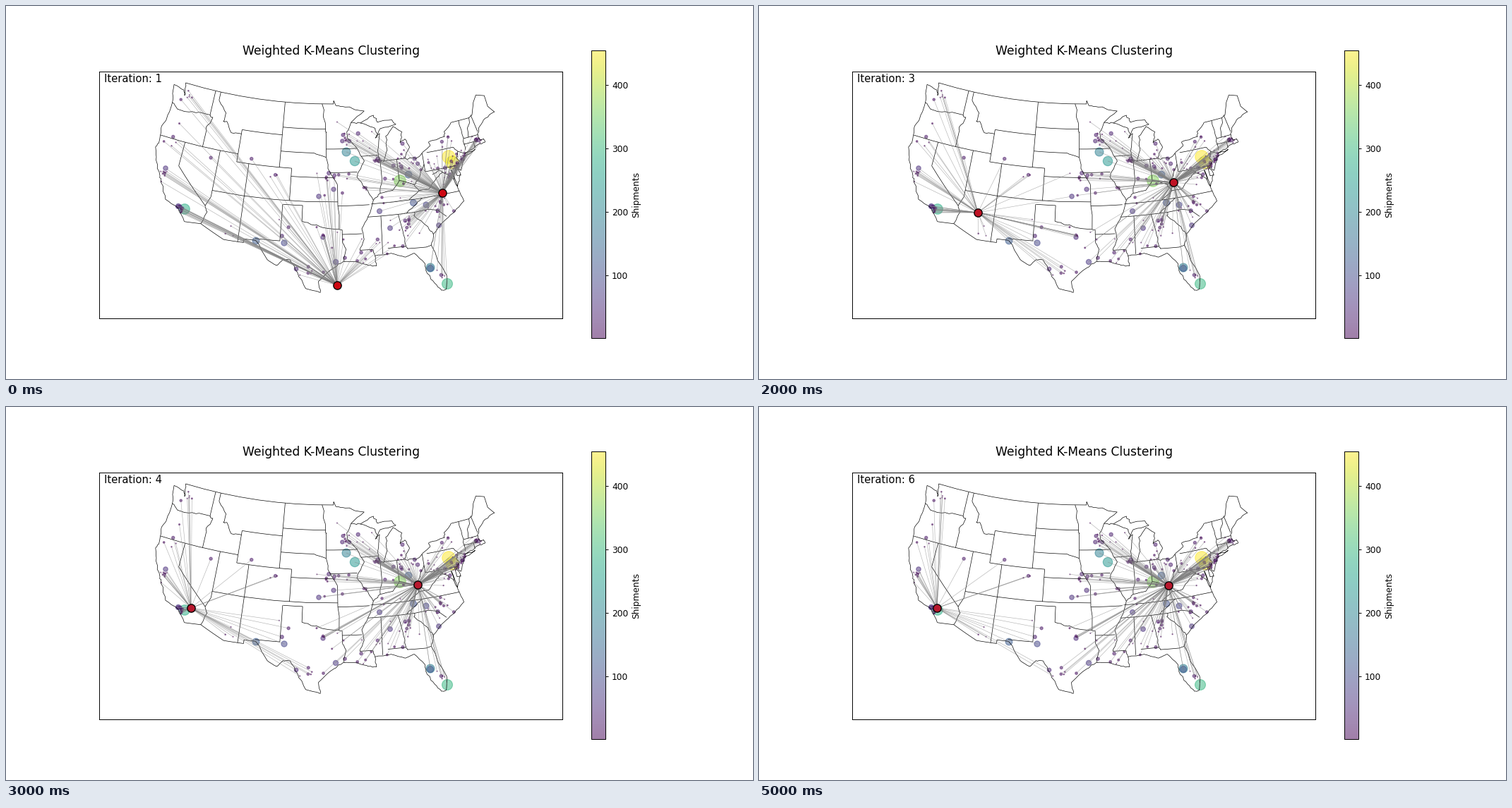
Write a matplotlib script that moves like this. It is 1058x529 px and loops after 6 s.

```python
import numpy as np
import matplotlib.pyplot as plt
from matplotlib.animation import FuncAnimation
from matplotlib.collections import LineCollection
from matplotlib.path import Path

W, H = 1058, 529
LEFT, RIGHT, TOP, BOTTOM = 132.25, 788.4, 93.0, 442.6
MAX_LOAD = 454

plt.rcParams["font.family"] = "DejaVu Sans"
rng = np.random.default_rng(11)

# Lambert conformal conic, parallels 33 and 45, meridian 96 W
CONE = 0.63051
RADIUS = 1.95495


def project(west, lat):
    """Degrees west and north to stage pixels."""
    rho = RADIUS / np.tan(np.pi / 4 + np.radians(lat) / 2) ** CONE
    theta = np.radians(96 - west) * CONE
    return 457.2 + 664.2 * rho * np.sin(theta), 664.2 * rho * np.cos(theta) - 559.3


def trace(*coords, rough=0.0):
    """Join west, lat pairs; rough lines wander a little between them."""
    west, lat = np.reshape(coords, (-1, 2)).T
    key = np.arange(len(west))
    t = np.linspace(0, len(west) - 1, (len(west) - 1) * 4 + 1)
    line = np.column_stack(project(np.interp(t, key, west), np.interp(t, key, lat)))
    wander = rng.normal(0, 1, line.shape) * rough
    wander[::4] = 0
    return line + wander


def river(*coords):
    return trace(*coords, rough=0.6)


coast = [
    # Pacific
    river(122.76, 49, 122.3, 47.5, 122.7, 48.1, 124.7, 48.38, 124, 46.25, 124.1, 44,
          124.5, 42.85, 124.1, 41, 124.4, 40.4, 123.7, 38.9, 122.4, 37.2, 121.9, 36.4,
          120.6, 34.6, 118.5, 34, 117.12, 32.53),
    # Southern border
    trace(117.12, 32.53, 114.72, 32.72, 111.07, 31.33, 108.2, 31.33, 108.2, 31.78,
          106.53, 31.78),
    river(106.53, 31.78, 104.6, 29.6, 103.2, 28.98, 102.4, 29.75, 101.4, 29.77,
          100.3, 28.3, 99.1, 26.4, 97.14, 25.96),
    # Gulf and Florida
    river(97.14, 25.96, 97.4, 27.3, 95.3, 28.95, 94, 29.68, 92, 29.6, 90.5, 29.1,
          89.4, 28.98, 89.5, 30.2, 87.2, 30.35, 85.3, 29.7, 84, 30.05, 82.7, 28.6,
          82.6, 27.4, 81.8, 26.1, 81.1, 25.15, 80.4, 25.2, 80.05, 26.8, 81.45, 30.7),
    # Atlantic
    river(81.45, 30.7, 80.9, 32, 79.3, 33.2, 78, 33.9, 76.5, 34.65, 75.55, 35.25,
          76, 36.9, 76.3, 38, 76.4, 39.3, 76, 37.2, 75.1, 38.6, 75.5, 39.5, 74.9, 39,
          74, 40.5, 71.9, 41.07, 73.7, 40.9, 71.85, 41.32, 71.2, 41.55, 70, 41.6,
          70.1, 42.05, 70.7, 42, 70.8, 42.88, 70.2, 43.6, 68.8, 44.4, 66.98, 44.8),
    # Northeast and Great Lakes
    trace(66.98, 44.8, 67.8, 45.7, 67.8, 47.07, 69.2, 47.45, 70, 46.7, 70.85, 45.25,
          71.5, 45.01, 74.7, 45),
    river(74.7, 45, 76.2, 44.1, 76.3, 43.5, 79.05, 43.27, 79, 42.75, 81.7, 41.5,
          83.45, 41.73, 82.42, 43, 83, 44.07, 83.9, 43.7, 83.35, 45, 84.75, 45.78,
          86.2, 44.7, 86.2, 43, 86.9, 41.7, 87.6, 41.75, 87.8, 43, 87.2, 45.1, 88, 44.6,
          87, 45.7, 84.2, 46, 84.8, 46.6, 87.4, 46.5, 88, 47.4, 90.4, 46.57, 92.05, 46.7,
          89.6, 48, 93, 48.6, 94.7, 48.8),
    trace(94.7, 48.8, 95.1, 49.38, 95.15, 49, 109, 49, 122.76, 49),
]

rivers = [
    river(124, 46.25, 122.8, 45.65, 121.2, 45.65, 119, 46),
    river(116.92, 46, 116.5, 45.6, 117.2, 44.4, 117.03, 43.8),
    river(111.05, 44.48, 112.8, 44.4, 113.9, 45.65, 114.5, 45.55, 114.35, 46.65,
          116.05, 48),
    river(114.63, 35, 114.15, 34.3, 114.72, 32.72),
    river(100, 34.56, 98.1, 34.13, 96.5, 33.8, 94.04, 33.55),
    river(94.04, 32, 93.55, 31.2, 93.85, 29.7),
    river(97.23, 49, 96.56, 45.94, 96.45, 45.3),
    river(98.5, 43, 96.45, 42.49, 95.85, 40.7, 94.62, 39.1),
    river(92.05, 46.7, 92.85, 45.6, 92.75, 44.75, 91.22, 43.5, 90.15, 41.9, 91.1, 40.7,
          91.5, 40, 90.2, 38.6, 89.15, 37, 90.1, 35.1, 91.15, 33.6, 90.9, 32.3, 91.6, 31),
    river(89.73, 31, 89.5, 30.2),
    river(90.4, 46.57, 88.1, 45.9, 87.6, 45.1),
    river(87.53, 39.35, 88, 37.8),
    river(89.15, 37, 88, 37.8, 86, 38, 84.82, 39.1, 82.6, 38.4, 81.8, 38.95, 80.52, 40.64),
    river(82.6, 38.4, 81.97, 37.54, 83.68, 36.6),
    river(81.97, 37.54, 80.3, 37.6, 78.9, 38.75, 77.75, 39.3),
    river(76.3, 38, 77.05, 38.85, 78.4, 39.6, 79.48, 39.2),
    river(81.68, 36.59, 82.6, 36, 84.32, 34.99),
    river(83.1, 35, 83.3, 34.6, 81.5, 33, 80.9, 32),
    river(85.2, 32.9, 85, 31, 84.86, 30.7),
    river(75.35, 42, 74.7, 41.36, 75.2, 40.6, 74.75, 40.2, 75.55, 39.5),
    river(73.35, 45, 73.27, 42.75, 73.5, 41.3),
    river(71.5, 45.01, 72.45, 42.73),
]

# Straight state lines: latitude with west and east ends
parallels = [
    (46, 119, 117), (42, 124.2, 111.05), (41, 111.05, 102.05), (40, 102.05, 95.3),
    (37, 114.05, 94.62), (45, 111.05, 104.05), (45.94, 104.05, 96.56), (43, 104.05, 98.5),
    (43.5, 96.45, 91.22), (40.6, 95.77, 91.4), (36.5, 103, 100), (32, 106.62, 103.05),
    (33, 94.04, 91.15), (36.5, 94.62, 89.8), (31, 91.6, 89.73), (42.5, 90.64, 87.8),
    (41.73, 87, 83.45), (36.57, 89.5, 75.9), (35, 90.15, 83.1), (31, 87.6, 85),
    (39.72, 80.52, 75.79), (42, 79.76, 75.35), (42.73, 73.27, 70.8), (42.03, 73.5, 71.3),
]
# Longitude with north and south ends
meridians = [
    (117.03, 49, 46), (117.03, 43.8, 42), (116.05, 49, 48), (111.05, 45, 41),
    (109.05, 41, 31.33), (104.05, 49, 41), (102.05, 41, 37), (103.05, 36.5, 32),
    (100, 36.5, 34.56), (114.04, 42, 36.2), (120, 42, 39), (96.45, 45.3, 42.49),
    (94.62, 39.1, 36.5), (94.04, 33.55, 32), (87.53, 41.7, 39.35), (84.81, 41.7, 39.1),
    (80.52, 42, 39.72), (71.83, 42.02, 41.32),
]
slants = [
    trace(120, 39, 114.63, 35), trace(114.04, 36.2, 114.63, 35),
    trace(94.62, 36.5, 94.43, 35.4, 94.48, 33.64),
    trace(88.2, 35, 88.4, 30.35), trace(85.6, 34.98, 85.2, 32.9),
    trace(84.86, 30.7, 82.2, 30.57, 81.45, 30.7),
    trace(83.1, 35, 81.05, 35.1, 79.67, 34.8, 78.55, 33.85),
    trace(75.79, 39.72, 75.7, 38.46, 75.05, 38.45),
    trace(74.7, 41.36, 73.9, 41), trace(71.08, 45.3, 70.7, 43.07),
]
grid = ([trace(w, lat, e, lat) for lat, w, e in parallels]
        + [trace(west, n, west, s) for west, n, s in meridians])
outlines = coast + rivers + slants + grid
land = Path(np.vstack(coast))

# Largest customers: x, y, shipments
sites = [
    (627, 214, 454), (632, 222, 440), (558, 248, 365), (625, 394, 295), (253, 288, 280),
    (494, 220, 235), (482, 207, 190), (601, 371, 190), (601, 372, 110), (354, 333, 125),
    (570, 239, 125), (577, 279, 110), (394, 336, 90), (595, 282, 85), (244, 284, 70),
    (467, 363, 70), (529, 291, 65), (544, 315, 60), (613, 311, 60), (443, 270, 55),
    (226, 230, 55), (464, 260, 50), (449, 328, 50), (411, 373, 40),
]
# Busy areas: x, y, spread, number of small customers
towns = [
    (256, 122, 6, 6), (230, 192, 9, 5), (224, 240, 5, 8), (247, 289, 3, 13),
    (306, 318, 9, 3), (289, 215, 1, 1), (348, 217, 1, 1), (381, 241, 3, 3),
    (430, 376, 8, 6), (450, 325, 2, 5), (481, 187, 3, 9), (455, 250, 11, 7),
    (526, 219, 2, 10), (508, 257, 2, 4), (560, 205, 8, 8), (586, 228, 9, 10),
    (553, 242, 9, 6), (570, 308, 4, 10), (612, 285, 9, 14), (510, 350, 12, 9),
    (620, 382, 4, 5), (647, 213, 4, 14), (666, 189, 4, 13), (636, 225, 6, 14),
    (620, 236, 9, 9), (620, 191, 11, 6), (500, 180, 12, 7), (550, 320, 18, 10),
]


def settle(x, y, dx, dy, count):
    """Sprinkle customers around a point, on land only."""
    while count:
        spot = rng.normal((x, y), (dx, dy))
        if land.contains_point(spot):
            sites.append((*spot, 1 + 36 * rng.random() ** 4))
            count -= 1


for x, y, spread, count in towns:
    settle(x, y, spread, spread, count)
settle(470, 275, 70, 45, 16)

sites = np.array(sorted(sites, key=lambda s: -s[2]))
spots, load = sites[:, :2], sites[:, 2]

# Western and eastern centre at each iteration
CENTRES = np.array([
    [(469, 396), (618, 265)],
    [(352, 308), (589, 247.5)],
    [(310, 293), (587, 250)],
    [(262, 285), (583, 252)],
    [(253, 285.5), (579.5, 253)],
    [(252, 285), (579.5, 253)],
])
RED_START = np.array([205, 8, 18]) / 255
RED_END = np.array([184, 24, 46]) / 255

fig = plt.figure(figsize=(12, 6), dpi=88.167, facecolor="white")
ax = fig.add_axes([LEFT / W, 1 - BOTTOM / H, (RIGHT - LEFT) / W, (BOTTOM - TOP) / H])
ax.set(xlim=(LEFT, RIGHT), ylim=(BOTTOM, TOP), xticks=[], yticks=[])
ax.set_title("Weighted K-Means Clustering", fontsize=14, pad=20)

dots = ax.scatter(*spots.T, s=load * 0.5, c=load, cmap="viridis", alpha=0.5,
                  vmin=1, vmax=MAX_LOAD, zorder=1)
ax.add_collection(LineCollection(outlines, colors="black", linewidths=0.55, zorder=1.5),
                  autolim=False)
links = LineCollection([], colors="gray", linewidths=0.5, alpha=0.6, zorder=2)
ax.add_collection(links, autolim=False)
hubs = ax.scatter(*CENTRES[0].T, s=85, color=[RED_START], edgecolors="black",
                  linewidths=1.1, zorder=3)
label = ax.text(0.01, 0.992, "", transform=ax.transAxes, fontsize=12, va="top", zorder=4)

cax = fig.add_axes([829.2 / W, 0.11, 20.1 / W, 0.77])
fig.colorbar(dots, cax=cax, label="Shipments")


def draw(i):
    centres = CENTRES[i]
    gaps = np.linalg.norm(spots[:, None] - centres[None], axis=2)
    nearest = centres[gaps.argmin(axis=1)]
    links.set_segments(np.stack([spots, nearest], axis=1))
    hubs.set_offsets(centres)
    hubs.set_facecolor([RED_START + (RED_END - RED_START) * min(i / 3, 1)])
    label.set_text(f"Iteration: {i + 1}")
    return links, hubs, label


anim = FuncAnimation(fig, draw, frames=len(CENTRES), interval=1000, repeat=True,
                     repeat_delay=0, blit=False)
plt.show()
```
